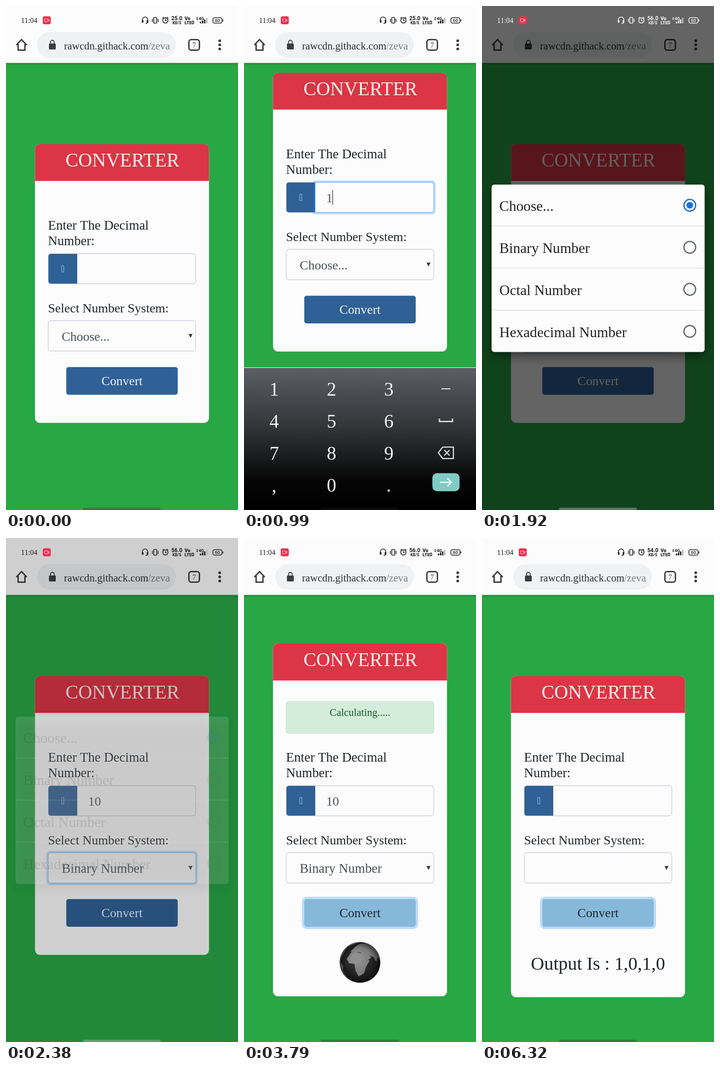
These frames come from a looping animation (508x1102 px, 6.78 s). An HTML page with a canvas:

```html
<!DOCTYPE html>
<html lang="en">
<head>
<meta charset="utf-8">
<title>Number converter</title>
<style>
  html, body { margin: 0; width: 100%; height: 100%; overflow: hidden; background: #28a745; }
  canvas { display: block; width: 508px; height: 1102px; }
</style>
</head>
<body>
<canvas id="stage" width="508" height="1102"></canvas>
<script>
const ctx = document.getElementById('stage').getContext('2d');
const W = 508, H = 1102, LOOP = 6780;
const SERIF = '"Liberation Serif", serif', SANS = 'Roboto, sans-serif';
const BLUE = '#2f6197', INK = '#212529', GREY = '#495057', PAPER = '#fcfcfc';

// Times of the main events, in ms
const T = {
  focus: 200, keysIn: 270, resize: 510, one: 820, two: 1080, select: 1400,
  keysOut: 1660, restore: 1780, dialog: 1750, pick: 2290, closed: 2420,
  tap: 2950, submit: 3290, result: 5330
};

const ramp = (t, a, b) => Math.min(1, Math.max(0, (t - a) / (b - a)));
const ease = k => 1 - (1 - k) ** 3;
const mix = (a, b, k) => `rgb(${a.map((v, i) => Math.round(v + (b[i] - v) * k))})`;

function text(str, x, y, size, color, align = 'left', family = SERIF, weight = 400) {
  ctx.font = `${weight} ${size}px ${family}`;
  ctx.textAlign = align;
  ctx.fillStyle = color;
  ctx.fillText(str, x, y);
}

function box(x, y, w, h, r, fill, stroke, width = 1) {
  ctx.beginPath();
  ctx.roundRect(x, y, w, h, r);
  if (fill) { ctx.fillStyle = fill; ctx.fill(); }
  if (stroke) { ctx.strokeStyle = stroke; ctx.lineWidth = width; ctx.stroke(); }
}

function path(d, stroke, width, fill) {
  const p = new Path2D(d);
  if (fill) { ctx.fillStyle = fill; ctx.fill(p); }
  if (stroke) { ctx.strokeStyle = stroke; ctx.lineWidth = width; ctx.stroke(p); }
}

function dot(x, y, r, fill, stroke, width) {
  ctx.beginPath();
  ctx.arc(x, y, r, 0, 7);
  if (fill) { ctx.fillStyle = fill; ctx.fill(); }
  if (stroke) { ctx.strokeStyle = stroke; ctx.lineWidth = width; ctx.stroke(); }
}

function browserBar() {
  const c = '#3c3d41';
  ctx.save();
  ctx.shadowColor = 'rgba(0,0,0,.3)';
  ctx.shadowBlur = 5;
  ctx.shadowOffsetY = 1;
  ctx.fillStyle = PAPER;
  ctx.fillRect(-10, -10, W + 20, 134.5);
  ctx.restore();

  path('M22.5 85.5L34 73.5L45.500 85.5M26.500 83V96.500H41.500V83', c, 3);
  box(68, 57, 304, 56, 28, '#eff1f2');
  box(94, 82, 15, 13, 2, c);
  path('M97.500 82V79a4 4 0 0 1 8 0V82', c, 2);
  text('rawcdn.githack.com', 127, 95, 22.8, '#2d2e31');
  text('/zeva', 311, 95, 22.8, '#7d7f83');
  box(400.5, 73.5, 23, 23, 5, null, c, 3);
  text('7', 412, 90.5, 16, c, 'center');
  for (const y of [76, 85, 94]) dot(468, y, 3, c);
}

function statusBar(t, white) {
  const c = white ? '#f4f4f4' : '#1d1d1f';
  text('11:04', 33, 37, 16, c);
  box(80.5, 22.5, 17.5, 17.5, 4, '#ee314d');
  box(84.5, 28, 7, 6.5, 1, null, '#ffd9de', 1);
  path('M91.500 31L94.500 28.500V34Z', null, 0, '#ffd9de');

  path('M298.500 33V30a6 6 0 0 1 12 0V33M310.500 35q0 3-5 3', c, 1.7);
  box(297.5, 31, 3.5, 5.5, 1, c);
  box(308, 31, 3.5, 5.5, 1, c);
  box(323.5, 25, 6.5, 12.5, 1, null, c, 1.7);
  path('M320.500 28v7M333 28v7', c, 1.6);
  dot(349, 31.5, 5.7, null, c, 1.7);
  path('M349 28V32H352M342.500 27l3.500-3M355.500 27l-3.500-3', c, 1.5);

  const rate = t < 1000 ? '25.0' : t < 4980 ? '56.0' : '54.0';
  text(rate, 374, 30.5, 12, c, 'center', SANS, 700);
  text('KB/S', 374, 39.5, 8.5, c, 'center', SANS, 700);
  text('Vo', 391, 30.5, 10.5, c, 'left', SANS, 900);
  text('LTE', 391, 39.5, 9.5, c, 'left', SANS, 900);
  box(407.5, 33, 3.5, 6, 1, null, c, 1.5);
  text('4G', 422, 31, 9, c, 'left', SANS, 700);
  path('M416.500 27l2.300-2.700 2.300 2.700zM416.500 28.500l2.300 2.700 2.300-2.700z', null, 0, c);
  [4, 6, 8.5, 12].forEach((h, i) => {
    ctx.fillStyle = i < 3 ? c : '#b5b5b8';
    ctx.fillRect(424.5 + i * 4.5, 38 - h, 3, h);
  });
  box(453, 25.5, 20, 12, 4, null, c, 1.6);
  path('M475 29.500v4', c, 1.5);
  text('60', 463, 35, 9.5, c, 'center', SANS, 500);
}

// A field's border with its focus glow; k runs from 0 to 1
function focusBorder(x, y, w, h, r, k) {
  if (k > 0) box(x - 2, y - 2, w + 4, h + 4, r, null, `rgba(0,123,255,${0.25 * k})`, 4);
  box(x, y, w, h, r, null, mix([200, 204, 214], [128, 189, 255], k), 1.3);
}

// Rough land outlines as longitude, latitude pairs
const LAND = [
  [-17, 15, -6, 35, 10, 37, 32, 31, 43, 12, 51, 11, 40, -5, 35, -24, 20, -35, 12, -17, 9, 4, -8, 5],
  [-9, 38, -3, 48, 8, 62, 25, 71, 70, 72, 110, 75, 170, 68, 140, 55, 122, 38, 105, 10, 90, 22,
    78, 8, 70, 22, 48, 30, 58, 20, 45, 13, 35, 30, 28, 37, 15, 40],
  [-80, 0, -72, 11, -50, 0, -35, -7, -48, -26, -70, -54, -71, -18],
  [-165, 65, -125, 70, -58, 52, -81, 26, -97, 26, -80, 8, -118, 33, -150, 60],
  [114, -22, 142, -11, 153, -27, 147, -38, 115, -34]
];

function globe(t) {
  const R = 44.5, rad = Math.PI / 180, tilt = 7 * rad;
  const turn = 24 - (t - 3790) * 360 / 2400;
  ctx.save();
  ctx.translate(254, 928);
  dot(0, 0, R, '#252525');
  ctx.clip();
  for (const land of LAND) {
    let seen = false;
    ctx.beginPath();
    for (let i = 0; i < land.length; i += 2) {
      const a = (land[i] - turn) * rad, b = land[i + 1] * rad;
      let x = Math.cos(b) * Math.sin(a);
      const d = Math.cos(b) * Math.cos(a);
      let y = Math.sin(b) * Math.cos(tilt) - d * Math.sin(tilt);
      const z = Math.sin(b) * Math.sin(tilt) + d * Math.cos(tilt);
      if (z > 0) seen = true;
      else { const n = Math.hypot(x, y) || 1; x /= n; y /= n; }
      ctx.lineTo(x * R, -y * R);
    }
    ctx.closePath();
    ctx.lineJoin = 'round';
    if (seen) {
      ctx.fillStyle = ctx.strokeStyle = '#858585';
      ctx.lineWidth = 2;
      ctx.fill();
      ctx.stroke();
    }
  }
  const shade = ctx.createRadialGradient(-8, -8, 8, 0, 0, R);
  shade.addColorStop(0, 'rgba(255,255,255,.1)');
  shade.addColorStop(0.6, 'rgba(0,0,0,.08)');
  shade.addColorStop(1, 'rgba(0,0,0,.6)');
  dot(0, 0, R, shade);
  ctx.restore();
  dot(254, 928, R, null, '#77777766', 1);
}

function card(t) {
  const loading = t >= T.submit && t < T.result, done = t >= T.result;
  const top = loading ? 231 : 302, bottom = loading ? 1002 : done ? 1004 : 911.5;
  box(63.5, top, 381, bottom - top, 11, PAPER);
  box(63.5, top, 381, 80.5, [11, 11, 0, 0], '#dc3545');
  text('CONVERTER', 255, top + 48.5, 42, '#f8f1ea', 'center');

  if (loading) {
    box(92, 357.5, 324, 69.5, 5, '#d4edda', '#bfe3c8');
    text('Calculating.....', 254, 389, 22.7, '#155724', 'center');
    globe(t);
  }
  if (done) text('Output Is : 1,0,1,0', 254, 944, 40.4, INK, 'center');

  text('Enter The Decimal', 92, 489, 29, INK);
  text('Number:', 92, 522.5, 28.7, INK);
  const typing = ramp(t, T.focus, T.focus + 150) - ramp(t, T.select, T.select + 150);
  box(92.5, 541.5, 323, 66, 6, null, '#c8ccd6', 1.3);
  box(93, 542, 63, 65, [5, 0, 0, 5], BLUE);
  box(122, 567.5, 4.5, 14, 0, null, '#a9c4de', 1);
  if (typing > 0) focusBorder(156, 541.5, 259.5, 66, [0, 6, 6, 0], typing);
  const value = done || t < T.one ? '' : t < T.two ? '1' : '10';
  text(value, 180, 584.5, 28, GREY);
  if (t >= T.focus && t < T.select) {
    const since = t - (t < T.one ? T.focus : t < T.two ? T.one : T.two);
    if (since % 1000 < 500) {
      ctx.fillStyle = '#333';
      ctx.fillRect(179.5 + value.length * 14, 558, 1.3, 33);
    }
  }

  text('Select Number System:', 92, 669.5, 28, INK);
  const choosing = ramp(t, T.select, T.select + 150) - ramp(t, T.tap, T.tap + 150);
  focusBorder(92.5, 688, 323, 66.5, 6, choosing);
  if (!done) {
    if (t < T.pick) text('Choose...', 122, 731.5, 28, GREY);
    else text('Binary Number', 122, 731.5, 28.8, GREY);
  }
  path('M399.500 717H408.500L404 726Z', null, 0, '#444');

  const lit = ramp(t, T.tap, T.tap + 150);
  if (lit > 0) box(129.5, 787, 249, 65.5, 8, null, `rgba(187,220,251,${lit})`, 5);
  box(132, 789.5, 244, 60.5, 5, mix([47, 97, 151], [134, 184, 218], lit));
  text('Convert', 254, 829, 27.9, mix([240, 244, 248], [33, 37, 41], lit), 'center');
}

function page(t) {
  const short = t >= T.resize && t < T.restore;
  ctx.fillStyle = '#fff';
  ctx.fillRect(0, 0, W, H);
  ctx.save();
  ctx.beginPath();
  ctx.rect(0, 0, W, short ? 790 : H);
  ctx.clip();
  ctx.fillStyle = '#28a745';
  ctx.fillRect(0, 0, W, H);
  if (short) ctx.translate(0, -156);
  card(t);
  ctx.restore();
}

function keyboard(t) {
  const shown = ease(ramp(t, T.keysIn, T.keysIn + 190));
  const gone = ramp(t, T.keysOut, T.restore);
  const alpha = shown * (1 - gone * 0.55);
  if (alpha <= 0 || gone >= 1) return;
  ctx.save();
  ctx.globalAlpha = alpha;
  ctx.translate(0, (1 - shown) * 60 + gone * 50);
  const g = ctx.createLinearGradient(0, 790, 0, H);
  g.addColorStop(0, '#5c5f64');
  g.addColorStop(0.4, '#35373a');
  g.addColorStop(0.8, '#060606');
  g.addColorStop(1, '#000');
  ctx.fillStyle = g;
  ctx.fillRect(0, 791, W, H - 791);
  ctx.fillStyle = '#f4f4f4';
  ctx.fillRect(0, 790, W, 1.2);

  const c = '#f3f3f3';
  [...'123456789,0.'].forEach((k, i) =>
    text(k, 66 + i % 3 * 125.5, 851.5 + Math.floor(i / 3) * 70.2, 41.5, c, 'center'));
  path('M432 837H452', c, 2);
  path('M428 902V908.500H456.500V902', '#d8d8d8', 3);
  path('M435 964.500H458.500V989.500H435L425.500 977ZM438.500 971L450 983M450 971L438.500 983', '#dedede', 2.5);
  box(412.5, 1021.5, 59.5, 39.5, 10, '#80cbc4');
  path('M429 1041.500H454M445.500 1033L454 1041.500L445.500 1050', '#fff', 2.6);
  ctx.restore();
}

function dialog(k) {
  const rows = ['Choose...', 'Binary Number', 'Octal Number', 'Hexadecimal Number'];
  ctx.save();
  ctx.globalAlpha = k ** 1.7;
  ctx.save();
  ctx.shadowColor = 'rgba(0,0,0,.45)';
  ctx.shadowBlur = 22;
  ctx.shadowOffsetY = 9;
  box(21, 390.5, 466.5, 366, 6, '#fdfdfd');
  ctx.restore();
  rows.forEach((row, i) => {
    const y = 435.7 + i * 91.9;
    text(row, 38, y + 12.3, 31.7, '#222');
    dot(455, y, 12.8, null, i ? '#5f6764' : '#1a6fdc', 2.8);
    if (!i) dot(455, y, 7.2, '#1a6fdc');
    if (i) {
      ctx.fillStyle = '#dbe2e2';
      ctx.fillRect(21, y - 47, 466.5, 1.6);
    }
  });
  ctx.restore();
}

function draw(t) {
  page(t);
  browserBar();
  keyboard(t);
  const k = ease(ramp(t, T.dialog, 1915)) * (1 - ramp(t, T.pick, T.closed));
  if (k > 0) {
    ctx.fillStyle = `rgba(0,0,0,${0.6 * k})`;
    ctx.fillRect(0, 0, W, H);
    dialog(k);
  }
  statusBar(t, k > 0.5);
  const light = t >= T.keysOut && t < 2620;
  box(168.5, 1097, 170.5, 5, 2.5, light ? 'rgba(175,175,175,.5)' : 'rgba(40,40,50,.3)');
}

function tick(now) {
  draw(now % LOOP);
  requestAnimationFrame(tick);
}
requestAnimationFrame(tick);
</script>
</body>
</html>
```
